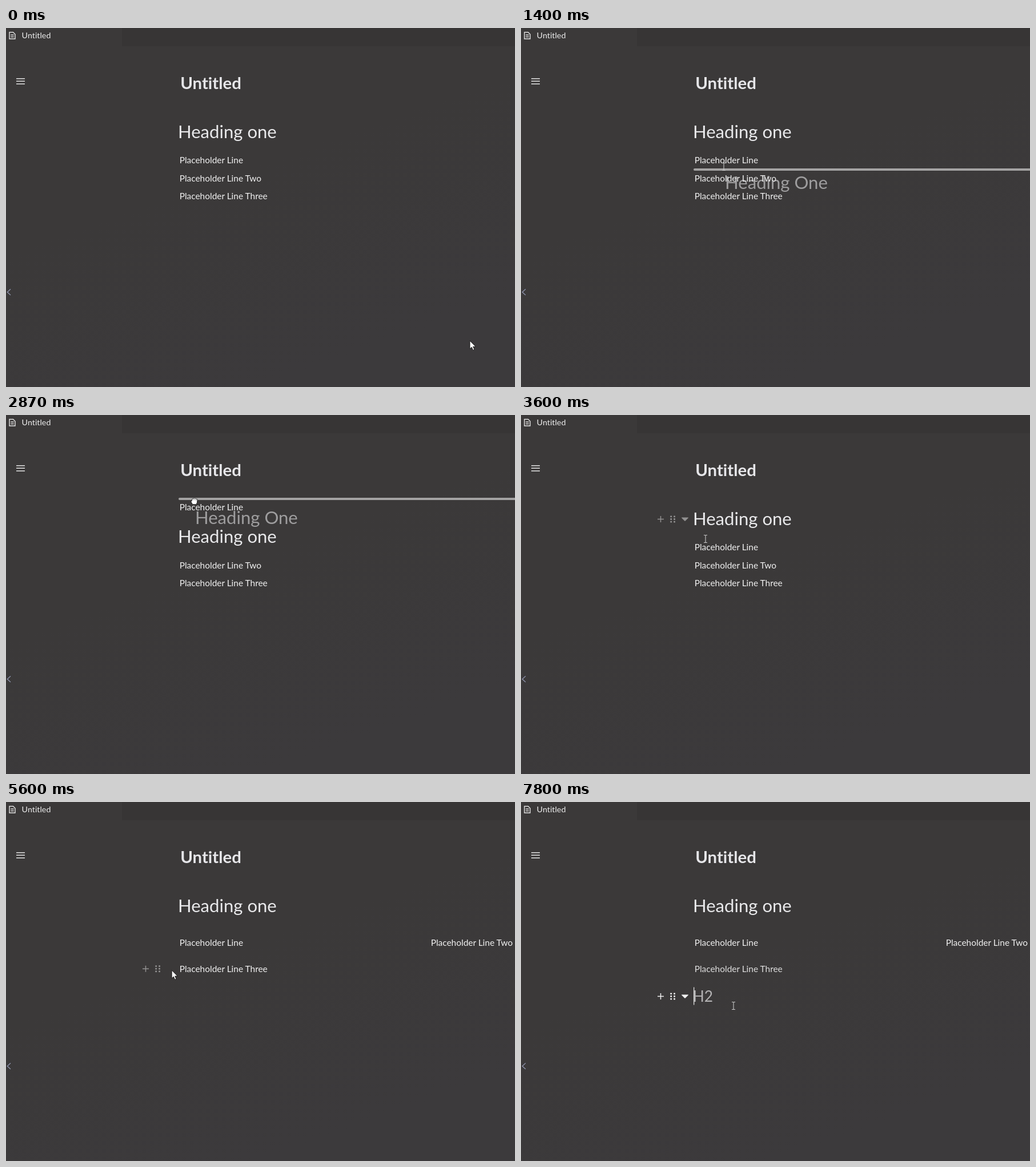
An HTML page for the animation above (8000 ms loop, 891 by 629 pixels).

```html
<!DOCTYPE html>
<html lang="en">
<head>
<meta charset="utf-8">
<title>Block editor</title>
<style>
  html, body { margin: 0; width: 100%; height: 100%; overflow: hidden; background: #3b3939; }
  svg { display: block; width: 891px; height: 629px; font-family: Lato, "Open Sans", sans-serif; font-variant-ligatures: none; }
  .p { font-size: 15.45px; fill: #f1f1f1; }
  .h1 { font-size: 31.1px; fill: #e9e9eb; }
  .title { font-size: 29.4px; font-weight: 700; fill: #e6e6e9; }
  .label { font-size: 14.5px; font-weight: 700; fill: #e2e2e2; }
  .ghost { opacity: .57; }
  .stroke { fill: none; stroke: #e4e4e4; stroke-width: 1.4; }
  .num { font-weight: 700; fill: #e4e4e4; }
</style>
</head>
<body>
<svg viewBox="0 0 891 629">
  <defs>
    <linearGradient id="page" x2=".5" y2="1">
      <stop offset=".5" stop-color="#3b3939"/><stop offset="1" stop-color="#3c3a3c"/>
    </linearGradient>
    <linearGradient id="panel" x2=".7" y2="1">
      <stop stop-color="#252424"/><stop offset=".55" stop-color="#292626"/><stop offset="1" stop-color="#272626"/>
    </linearGradient>
  </defs>

  <rect width="891" height="629" fill="url(#page)"/>
  <rect x="203" width="688" height="32" fill="#373535"/>
  <g class="stroke">
    <path d="M6 7.5h6.5l3.5 3.5v8h-10zM8.3 12.3h5.4M8.3 15.5h5.4"/>
    <path d="M18 88.7h15M18 93.3h15M18 98h15" stroke-width="1.6"/>
    <path d="M8 457.5l-5.7 5.2 5.7 5.3" stroke="#8e93ab"/>
  </g>
  <text x="27.6" y="17.6" font-size="14.3" fill="#ececec">Untitled</text>
  <text class="title" x="305.2" y="107">Untitled</text>

  <text id="heading" class="h1">Heading one</text>
  <text id="line1" class="p">Placeholder Line</text>
  <text id="line2" class="p">Placeholder Line Two</text>
  <text id="line3" class="p">Placeholder Line Three</text>
  <g id="newBlock">
    <text x="300.8" y="349.7" font-size="26.3" fill="#b3b2b3">H2</text>
    <path d="M302.7 324.5v31" stroke="#eee" stroke-width="1.2"/>
  </g>

  <g id="handle">
    <rect id="grip" x="256" y="-9.5" width="19" height="19" rx="3" fill="#444243"/>
    <path d="M239 0h11M244.5-5.5v11" fill="none" stroke="currentColor" stroke-width="1.5"/>
    <g id="dots" fill="currentColor"></g>
    <path id="fold" d="M281.5-3h11q1 0 .2 1l-5 5q-.7.6-1.4 0l-5-5q-.8-1 .2-1z" fill="currentColor"/>
  </g>

  <rect id="dropLine" x="302" width="592" height="4" rx="2" fill="#a4a3a3"/>
  <rect id="dropBar" x="298" y="248" width="4" height="29" rx="2" fill="#a4a3a3"/>
  <text id="ghostHeading" class="h1 ghost">Heading One</text>
  <text id="ghostLine" class="p ghost">Placeholder Line</text>
  <g id="menu"></g>

  <path id="arrow" d="M0 0v14.2l3.2-3 2.3 5.2 2.4-1-2.3-5.1h4.5z" fill="#fff" stroke="#161616" stroke-width=".9"/>
  <path id="beam" d="M-3-6.5h2q1 0 1 1 0-1 1-1h2M-3 6.5h2q1 0 1-1 0 1 1 1h2M0-5.5v11" fill="none" stroke="#c9c9c9" stroke-width="1.1"/>
  <g id="hand">
    <path d="M-3 5.8L-5.6 1.4Q-6.3-.5-4.3-.6L-3.8-3.6Q-2.8-5.2-1.7-4.2Q-.4-6 .9-4.4Q2.3-5.6 3.2-3.8Q5.4-4.2 5.4-1.8L4.8 2.7 3.4 5.8z" fill="#fff" stroke="#1b1b1b" stroke-width=".9"/>
    <path d="M-1.6-3.5v2M1-3.6v2M3.3-3v2" stroke="#555" stroke-width=".7"/>
  </g>
</svg>

<script>
const LOOP = 8000, STEPS = 120;
const $ = id => document.getElementById(id);
const show = (id, on) => { $(id).style.display = on ? '' : 'none'; };
const move = (id, x, y) => $(id).setAttribute('transform', `translate(${x} ${y})`);
const within = (n, from, to) => n >= from && n <= to;

$('dots').innerHTML = [-1, 0, 1].flatMap(row => [262.7, 268.6].map(x =>
  `<rect x="${x - 1.4}" y="${row * 4.6 - 1.4}" width="2.8" height="2.8" rx=".8"/>`)).join('');

function menuMarkup() {
  const text = (x, y, str, cls, size = '') => `<text class="${cls}" x="${x}" y="${y}" ${size && `font-size="${size}"`}>${str}</text>`;
  const icon = (x, y, d) => `<path class="stroke" transform="translate(${x} ${y})" d="${d}"/>`;
  const label = (str, y) => text(24.6, y + 5, str, 'label');
  const item = (str, y, d) => icon(41, y, d) + text(57.4, y + 5.5, str, 'p');
  const quote = x => `<path transform="translate(${x} 375)" fill="#e4e4e4" d="M5.5-5.5Q0-4 0 2a2.9 2.9 0 1 0 2.3-2.7Q2.6-3 5.8-4.4z"/>`;
  const headings = [1, 2, 3, 4].map(n => {
    const x = 30 + n * 35.5;
    return icon(x, 338, 'M0-7v14M9-7v14M0 0h9') + text(x + 10.4, 345.2, n, 'num', 11);
  });
  const numbers = [1, 2, 3].map(n => text(29.5, 366.2 + n * 5.6, n, 'num', 7));
  return [
    '<rect x="7.5" y="281.5" width="237.5" height="360" rx="8" fill="url(#panel)"/>',
    label('Basic', 305.5),
    icon(38, 338, 'M-6.5-3.8v-2.9h13v2.9M0-6.7v13.4M-3 6.8h6'),
    ...headings,
    icon(215, 338, 'M-7.5-5.5h3M-7.5 0h3M-7.5 5.5h3M-2-7h6v3h-6zM-2-1.4h9v3h-9zM-2 4h9.5v3h-9.5z'),
    icon(38, 375, 'M-2-5.6h10.5M-2 0h10.5M-2 5.6h10.5'),
    ...numbers, quote(66), quote(73.8),
    label('Inline', 408),
    item('Emoji', 443, 'M-6 0a6 6 0 1 0 12 0a6 6 0 1 0-12 0M-2.9 1.6q2.9 3.2 5.8 0M-2.3-2.6v1.7M2.3-2.6v1.7'),
    label('Block', 477),
    item('To-Do', 512, 'M5.5-.5v6h-11v-11h8.5M-3-.8l2.8 2.8 6-6.5'),
    item('Table', 543, 'M-6-5.5h12v11h-12zM-6-2.2h12M-6 1.7h12M-2-2.2v7.7M2-2.2v7.7'),
    label('Media', 578),
    item('Image', 612, 'M1.5-5.5h-7v11h11v-7M-3.5 3.5v-2l2-2 2 2 2-2.5 1.5 2v2.5zM4.5-6.5v4M2.5-4.5h4')
  ].join('');
}
$('menu').innerHTML = menuMarkup();

// Pointer moves: first step, last step, destination
const moves = [
  [0, 13, 266, 183], [13, 18, 355, 243],
  [24, 31, 267, 214], [33, 37, 322, 170], [37, 44, 330, 150],
  [50, 54, 323, 217], [54, 58, 266, 232], [61, 67, 280, 261],
  [75, 81, 364, 284], [81, 86, 268, 298],
  [89, 95, 138, 310], [95, 99, 107, 338],
  [102, 115, 372, 349], [115, 117, 372, 357]
];
const drags = [
  { from: 13, to: 21, block: 'heading' },
  { from: 33, to: 47, block: 'heading' },
  { from: 60, to: 72, block: 'line1' }
];
const easeOut = k => 1 - (1 - k) ** 1.6;

function pointerAt(n) {
  let x = 812, y = 548;
  for (const [from, to, toX, toY] of moves) {
    const k = easeOut(Math.min(1, Math.max(0, (n - from) / (to - from))));
    x += (toX - x) * k;
    y += (toY - y) * k;
  }
  return [x, y];
}

// Vertical centre of every block at a step
function layout(n) {
  const swapped = within(n, 22, 47), columns = n >= 73;
  return {
    heading: swapped ? 213.7 : 182.5,
    line1: swapped ? 161.2 : columns ? 246.2 : 231.2,
    line2: columns ? 246.2 : 263,
    line3: columns ? 292.2 : 294,
    newBlock: 340.5
  };
}

function render(n) {
  const rows = layout(n);
  const [x, y] = pointerAt(n);
  const [lagX, lagY] = pointerAt(Math.max(0, n - 1));
  const drag = drags.find(d => within(n, d.from, d.to));
  const menuOpen = within(n, 91, 103), added = n >= 104;

  move('heading', 300.9, rows.heading + 10.6);
  for (const id of ['line1', 'line2', 'line3'])
    move(id, id === 'line2' && n >= 73 ? 743.7 : 303.7, rows[id] + 5.5);
  $('line3').style.fill = added ? '#dedede' : '';
  show('newBlock', added);
  show('menu', menuOpen);

  // Dragged copy and drop marks
  const dragsHeading = drag?.block === 'heading', dragsLine = drag?.block === 'line1';
  const moved = drag && n > drag.from;
  show('ghostHeading', moved && dragsHeading);
  show('ghostLine', moved && dragsLine);
  move('ghostHeading', lagX + 2, lagY + 38.6);
  move('ghostLine', lagX + 6.6, lagY + 25.6);
  const below = y > 215, above = y < 172;
  const showLine = dragsHeading && (below || above), showBar = dragsLine && y > 250;
  show('dropLine', showLine);
  $('dropLine').setAttribute('y', below ? 246 : 145);
  show('dropBar', showBar);

  // Block handle follows the hovered row, or stays until a drag finds a place
  const hovered = Object.keys(rows).find(id =>
    Math.abs(lagY - rows[id]) < (id === 'heading' ? 28 : 14) && lagX > 235);
  const owner = added ? 'newBlock' : drag ? !showLine && !showBar && drag.block : !menuOpen && hovered;
  const onGrip = within(x, 256, 275) && owner;
  show('handle', owner);
  if (owner) {
    move('handle', 0, rows[owner]);
    show('fold', added || owner === 'heading' && !drag);
    show('grip', onGrip || drag);
    $('handle').style.color = added ? '#f0f0f0' : '#929191';
  }

  const shape = drag && n < drag.to || onGrip ? 'hand' : x > 300 && y < 370 ? 'beam' : 'arrow';
  for (const id of ['arrow', 'beam', 'hand']) show(id, id === shape);
  move(shape, x, y);
}

const start = performance.now();
function tick() {
  const time = (performance.now() - start) % LOOP;
  render(Math.floor(time / LOOP * STEPS + .05) % STEPS);
  requestAnimationFrame(tick);
}
tick();
</script>
</body>
</html>
```
